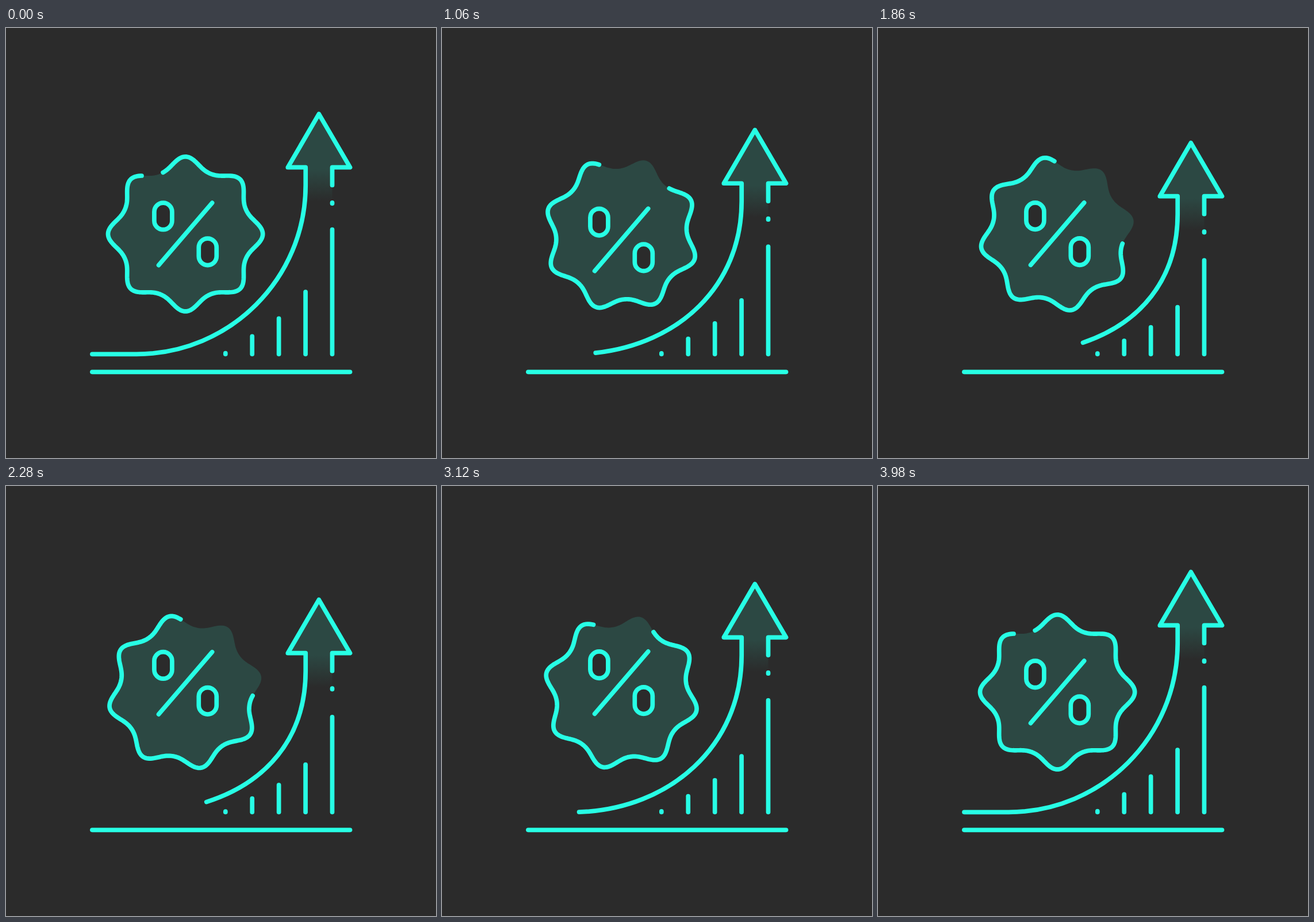
These frames come from a looping animation (748 by 748 pixels, 4 s). An HTML page:

```html
<!DOCTYPE html>
<html lang="en">
<head>
<meta charset="utf-8">
<title>Growth rate</title>
<style>
  html, body { margin: 0; width: 100%; height: 100%; overflow: hidden; background: #2b2b2b; }
  svg { display: block; width: 100%; height: 100%; }
  .line { fill: none; stroke: #27ffe5; stroke-width: 7.7; stroke-linecap: round; stroke-linejoin: round; }
  .tint { fill: #2c4843; }
  .hole { fill: #2b2b2b; }
</style>
</head>
<body>
<svg viewBox="0 0 748 748">
  <defs>
    <linearGradient id="fade" gradientUnits="userSpaceOnUse" x1="0" y1="246" x2="0" y2="302">
      <stop offset="0" stop-color="#2c4843"/>
      <stop offset="1" stop-color="#2c4843" stop-opacity="0"/>
    </linearGradient>
  </defs>

  <path class="line" d="M149.9 598.3H598.5"/>
  <g id="bars" class="line"></g>

  <g id="head">
    <path fill="url(#fade)" d="M521.2 304V242.4H490.3L544.3 149.6L598.5 242.4H567.5V304Z"/>
    <path class="line" d="M567.5 303.8v1.5"/>
  </g>
  <path id="arrow" class="line"/>

  <g id="badge">
    <path id="badgeFill" class="tint"/>
    <path id="badgeLine" class="line"/>
  </g>

  <g id="percent" class="line">
    <rect class="hole" x="257.9" y="304.2" width="31" height="46.5" rx="15.5"/>
    <rect class="hole" x="335.3" y="366.1" width="31" height="46.5" rx="15.5"/>
    <path d="M358.6 304.2L265.6 412.6"/>
  </g>
</svg>
<script>
const DURATION = 4000;
const FLOOR = 567.3;
const TRIM = 0.25;
const $ = id => document.getElementById(id);
const [bars, head, arrow, badge, badgeFill, badgeLine, percent] =
  ['bars', 'head', 'arrow', 'badge', 'badgeFill', 'badgeLine', 'percent'].map($);

const ease = s => s * s * (3 - 2 * s);
const mix = (a, b, s) => a + (b - a) * ease(s);

// Eight-lobed wavy outline around the origin; angles in degrees clockwise from the top.
function wave(from, to) {
  const points = [];
  const steps = Math.ceil(to - from);
  for (let i = 0; i <= steps; i++) {
    const a = (from + (to - from) * i / steps) * Math.PI / 180;
    const r = 123 + 10.5 * Math.cos(8 * a) + 1.1 * Math.cos(16 * a);
    points.push((r * Math.sin(a)).toFixed(2) + ' ' + (-r * Math.cos(a)).toFixed(2));
  }
  return 'M' + points.join('L');
}

// Hides the first part of a path, keeping the round cap at the cut.
function trimStart(path, share, length = path.getTotalLength()) {
  path.setAttribute('stroke-dasharray', `${length + 5} ${length + 5}`);
  path.setAttribute('stroke-dashoffset', -share * length);
}

badgeFill.setAttribute('d', wave(0, 360) + 'Z');
badgeLine.setAttribute('d', wave(-20, 323.1));
const badgeLength = badgeLine.getTotalLength();

const columns = [1.6, 30.9, 61.9, 108.3, 216.6].map((height, i) => {
  const path = document.createElementNS('http://www.w3.org/2000/svg', 'path');
  bars.append(path);
  return { path, height, x: 381.8 + 46.42 * i };
});

function arrowPath(drop) {
  const base = 242.4 + drop;
  return `M149.9 ${FLOOR}H227.2C389.5 ${FLOOR} 521.2 ${435.7 + drop} 521.2 ${273.5 + drop}` +
    `V${base}H490.3L544.3 ${149.6 + drop}L598.5 ${base}H567.5V${273.4 + drop}`;
}

function percentShift(phase) {
  const stops = [0, 11.3, -22.3, 0];
  const i = Math.min(2, Math.floor(phase * 3));
  return mix(stops[i], stops[i + 1], phase * 3 - i);
}

function draw(time) {
  const phase = (time % DURATION) / DURATION;
  const swing = ease(1 - Math.abs(1 - 2 * phase));
  const drop = 51 * swing;
  const share = TRIM * swing;

  for (const { path, height, x } of columns) {
    path.setAttribute('d', `M${x} ${FLOOR}v${-height * (1 - share)}`);
  }
  head.setAttribute('transform', `translate(0 ${drop})`);
  arrow.setAttribute('d', arrowPath(drop));
  trimStart(arrow, share);

  badge.setAttribute('transform', `translate(312.1 358.4) rotate(${35 * swing})`);
  trimStart(badgeLine, share, badgeLength);
  percent.setAttribute('transform', `translate(0 ${percentShift(phase)})`);
}

const start = performance.now();
function tick() {
  draw(performance.now() - start);
  requestAnimationFrame(tick);
}
tick();
</script>
</body>
</html>
```
